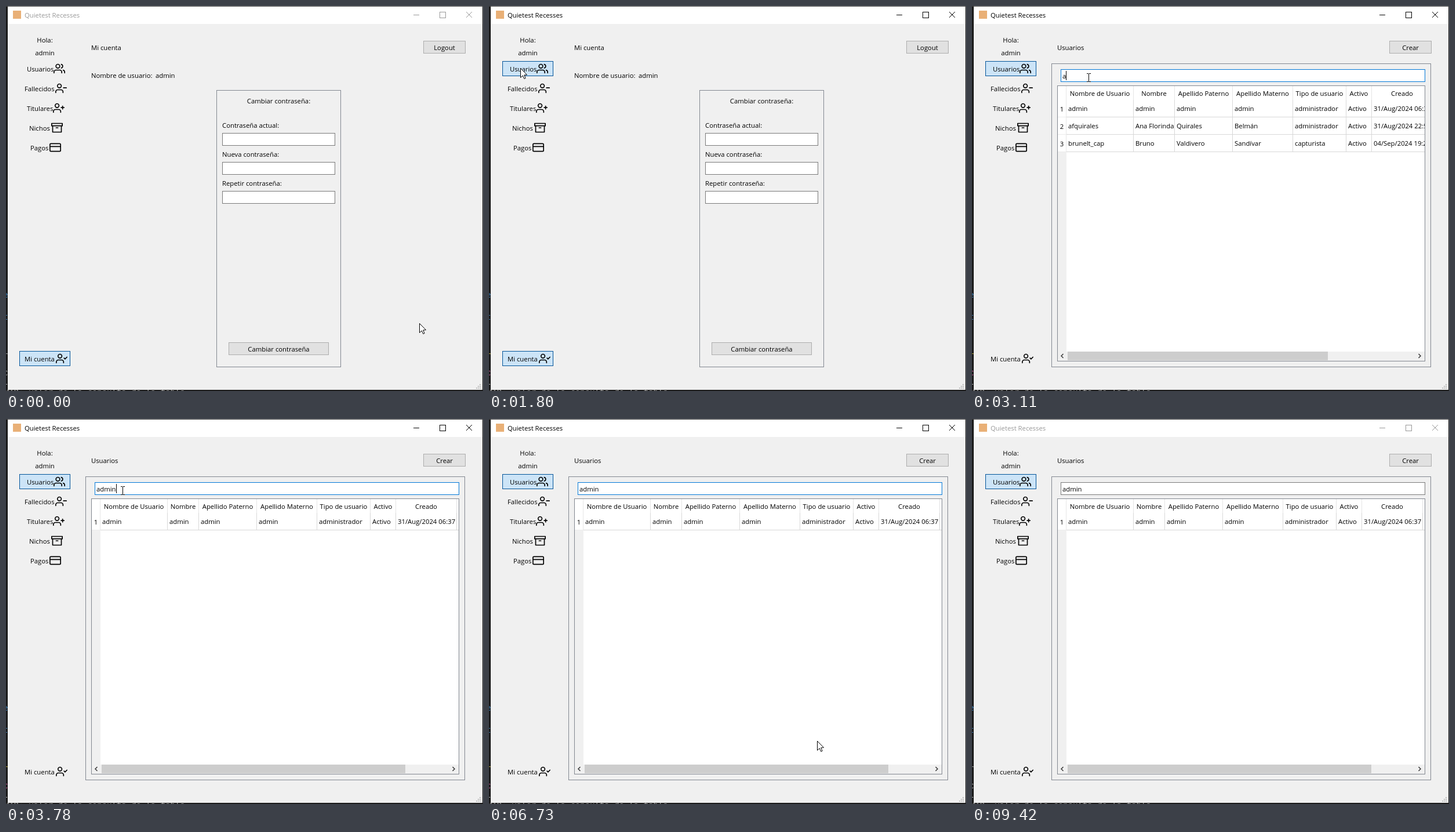
Write an HTML page with a canvas that moves like this. It is 823 px wide and 664 px high and loops after 9550 ms.

```html
<!DOCTYPE html>
<html lang="es">
<head>
<meta charset="utf-8">
<title>Usuarios</title>
<style>
html, body { margin: 0; width: 100%; height: 100%; overflow: hidden; background: #1c1c1c; }
canvas { display: block; }
</style>
</head>
<body>
<canvas id="stage" width="823" height="664"></canvas>
<script>
const g = document.getElementById('stage').getContext('2d');
const LOOP = 9550;
const FONT = '11.3px "Open Sans", "Noto Sans", sans-serif';
const MONO = '14px "DejaVu Sans Mono", monospace';

// Moments at which the interface changes
const CLICK = 1660, PAGE = 1930, HOVER = 2150, FOCUS = 2500, BLUR = 9420;
const FILTER_A = 3110, FILTER_AD = 3180;
const KEYS = [3040, 3180, 3450, 3580, 3780];
const BLINK = 532;

// Pointer samples: time, x, y
const TRACK = [
  [0, 713, 547], [70, 704, 530], [130, 640, 455], [200, 520, 345], [260, 380, 235],
  [330, 240, 150], [400, 130, 100], [460, 78, 82], [530, 55, 99], [730, 54, 99],
  [1060, 54, 103], [1130, 54, 107], [2010, 62, 109], [2080, 105, 114], [2150, 160, 120],
  [2220, 191, 124], [2290, 198, 126], [2360, 200, 126], [2630, 201, 123],
  [6450, 203, 128], [6520, 222, 172], [6590, 310, 290], [6660, 450, 450],
  [6730, 566, 555], [6800, 630, 605], [6870, 665, 631], [6940, -50, -50]
];

const person = (x, w) =>
  `M${w} 21v-2a4 4 0 0 0-4-4H5a4 4 0 0 0-4 4v2M${x + 4} 7a4 4 0 1 1-8 0a4 4 0 1 1 8 0`;
const ICONS = {
  users: person(9, 17) + 'M23 21v-2a4 4 0 0 0-3-3.87M16 3.13a4 4 0 0 1 0 7.75',
  minus: person(8.5, 16) + 'M23 11H17',
  plus: person(8.5, 16) + 'M20 8v6M23 11H17',
  box: 'M21 8v13H3V8M1 3h22v5H1zM10 12h4',
  card: 'M3 4h18a2 2 0 0 1 2 2v12a2 2 0 0 1-2 2H3a2 2 0 0 1-2-2V6a2 2 0 0 1 2-2zM1 10h22',
  check: person(8.5, 16) + 'M17 11l2 2 4-4'
};
for (const k in ICONS) ICONS[k] = new Path2D(ICONS[k]);

const MENU = [
  ['Usuarios', 36, 95, 82, 'users'],
  ['Fallecidos', 32, 129, 85, 'minus'],
  ['Titulares', 36, 163, 81, 'plus'],
  ['Nichos', 40, 197, 78, 'box'],
  ['Pagos', 42, 231, 75, 'card'],
  ['Mi cuenta', 32, 595, 86, 'check']
];

const HEAD = ['Nombre de Usuario', 'Nombre', 'Apellido Paterno', 'Apellido Materno',
  'Tipo de usuario', 'Activo', 'Creado'];
const ROWS = [
  ['admin', 'admin', 'admin', 'admin', 'administrador', 'Activo', '31/Aug/2024 06:37'],
  ['afquirales', 'Ana Florinda', 'Quirales', 'Belmán', 'administrador', 'Activo', '31/Aug/2024 22:51'],
  ['brunelt_cap', 'Bruno', 'Valdivero', 'Sandívar', 'capturista', 'Activo', '04/Sep/2024 19:24'],
  ['user', 'Nombre', 'user', 'user', 'capturista', 'Activo', '06/Sep/2024 12:55']
];

function fill(x, y, w, h, color) {
  g.fillStyle = color;
  g.fillRect(x, y, w, h);
}

function frame(x, y, w, h, border, inner) {
  if (inner) fill(x, y, w, h, inner);
  g.strokeStyle = border;
  g.lineWidth = 1;
  g.strokeRect(x + 0.5, y + 0.5, w - 1, h - 1);
}

function text(s, x, y, color = '#000', align = 'left') {
  g.font = FONT;
  g.textAlign = align;
  g.fillStyle = color;
  g.fillText(s, x, y);
}

function line(points, color, width = 1) {
  g.strokeStyle = color;
  g.lineWidth = width;
  g.beginPath();
  points.forEach(([x, y]) => g.lineTo(x, y));
  g.stroke();
}

function button(label, x, y, w) {
  frame(x, y, w, 22, '#adadad', '#e1e1e1');
  text(label, x + w / 2, y + 16, '#000', 'center');
}

function icon(name, x, y) {
  g.save();
  g.translate(x, y);
  g.scale(20 / 24, 20 / 24);
  g.strokeStyle = '#000';
  g.lineWidth = 2;
  g.lineCap = g.lineJoin = 'round';
  g.stroke(ICONS[name]);
  g.restore();
}

// Slivers of the dark editor behind the window
function backdrop(active) {
  fill(0, 0, 823, 664, '#1c1c1c');
  g.font = MONO;
  g.textAlign = 'left';
  const bits = [['e', 503, '#3f7fb5'], ['t', 541, '#3f7fb5'],
    ['r', 607, active ? '#b5a642' : '#999'], ['c', 637, active ? '#c55a9a' : '#aaa'], ['l', 653, '#aaa']];
  for (const [s, y, color] of bits) {
    g.fillStyle = color;
    g.fillText(s, -5, y);
  }
  g.fillStyle = '#999';
  g.fillText('MID: valor de la consulta de la tabla', -3, 671);
}

function windowFrame(active) {
  const ink = active ? '#000' : '#999';
  fill(3, 1, 819, 661, '#f0f0f0');
  fill(3, 1, 819, 30, '#fff');
  fill(0, 0, 823, 1, '#454545');
  fill(12, 8, 14, 14, '#e9b077');
  text('Quietest Recesses', 32, 20, ink);
  fill(703, 15, 10, 1, ink);
  frame(748, 10, 11, 11, ink);
  line([[794, 10], [804, 20]], ink);
  line([[804, 10], [794, 20]], ink);
  for (let i = 0; i < 3; i++)
    for (let j = 0; j <= i; j++) fill(817 - j * 3, 652 + i * 3, 2, 2, '#bfbfbf');
}

function sidebar(t) {
  text('Hola:', 67, 63, '#000', 'center');
  text('admin', 67, 85, '#000', 'center');
  for (const [label, x, y, ix, name] of MENU) {
    const on = name === 'users' ? t >= CLICK : name === 'check' && t < PAGE;
    if (on) frame(23, y, 88, 26, '#005499', '#cce4f7');
    text(label, x, y + 18);
    icon(name, ix, y + 3);
  }
}

function accountPage() {
  text('Mi cuenta', 147, 76);
  button('Logout', 720, 60, 73);
  text('Nombre de usuario:', 147, 124);
  text('admin', 258, 124);
  frame(363, 145, 215, 478, '#828790');
  text('Cambiar contraseña:', 470.5, 168, '#000', 'center');
  ['Contraseña actual:', 'Nueva contraseña:', 'Repetir contraseña:'].forEach((s, i) => {
    text(s, 373, 210 + i * 50);
    frame(373, 219 + i * 50, 195, 22, '#7a7a7a', '#fff');
  });
  button('Cambiar contraseña', 384, 580, 173);
}

function searchBox(t) {
  const focused = t >= FOCUS && t < BLUR;
  const border = focused ? '#0078d7' : t >= HOVER && t < FOCUS ? '#303030' : '#7a7a7a';
  const typed = 'admin'.slice(0, KEYS.filter(k => t >= k).length);
  frame(153, 109, 629, 22, border, '#fff');
  if (typed) text(typed, 156, 125);
  else text('Buscar usuario...', 156, 125, '#858585');
  if (!focused) return;
  const since = t - Math.max(FOCUS, ...KEYS.filter(k => t >= k));
  if (Math.floor((since + 2) / BLINK) % 2 === 0) {
    g.font = FONT;
    fill(Math.round(156 + g.measureText(typed).width), 112, 1, 16, '#000');
  }
}

function table(t) {
  const single = t >= FILTER_AD;
  const count = single ? 1 : t >= FILTER_A ? 3 : 4;
  const widths = [116, single ? 54 : 71, 100, 104, 92, 44, 105];
  const bottom = 162 + count * 30;
  const grid = '#d8d8d8';
  frame(147, 137, 635, 476, '#828790', '#fff');
  g.save();
  g.beginPath();
  g.rect(148, 138, 633, 474);
  g.clip();
  fill(148, bottom, 15, 596 - bottom, '#f0f0f0');
  if (t >= 6520 && t < 6590) fill(163, 162, 115, 29, '#e5f3ff');
  fill(162, 138, 1, bottom - 138, '#e5e5e5');
  let x = 163;
  widths.forEach((w, c) => {
    text(HEAD[c], x + w / 2 - 0.5, 155, '#000', 'center');
    for (let r = 0; r < count; r++) text(ROWS[r][c], x + 3, 181 + r * 30);
    x += w;
    fill(x - 1, 138, 1, 24, '#e5e5e5');
    fill(x - 1, 162, 1, bottom - 162, grid);
  });
  for (let r = 0; r < count; r++) {
    text(r + 1, 155, 182 + r * 30, '#000', 'center');
    fill(148, 191 + r * 30, 15, 1, '#ececec');
    fill(163, 191 + r * 30, 618, 1, grid);
  }
  fill(148, 596, 633, 16, '#f0f0f0');
  fill(165, 596, single ? 524 : 449, 15, '#cdcdcd');
  line([[157.5, 600], [154, 603.5], [157.5, 607]], '#404040', 1.6);
  line([[770.5, 600], [774, 603.5], [770.5, 607]], '#404040', 1.6);
  g.restore();
}

function usersPage(t) {
  text('Usuarios', 147, 76);
  button('Crear', 720, 60, 73);
  frame(137, 99, 655, 524, '#828790');
  searchBox(t);
  table(t);
}

function pointer(t) {
  const [, x, y] = TRACK.findLast(p => t >= p[0]);
  const beam = t >= PAGE && x > 153 && x < 782 && y > 109 && y < 131;
  if (beam) {
    fill(x, y - 6, 1, 13, '#000');
    for (const end of [y - 7, y + 7]) {
      fill(x - 3, end, 3, 1, '#000');
      fill(x + 1, end, 3, 1, '#000');
    }
    return;
  }
  g.save();
  g.translate(x + 0.5, y + 0.5);
  g.beginPath();
  [[0, 0], [0, 16], [3.7, 12.5], [6.3, 18], [8.6, 17], [6.2, 11.5], [11, 11.2]]
    .forEach(([px, py]) => g.lineTo(px, py));
  g.closePath();
  g.fillStyle = '#fff';
  g.fill();
  g.strokeStyle = '#000';
  g.lineWidth = 1;
  g.stroke();
  g.restore();
}

function draw(t) {
  const active = t >= CLICK && t < BLUR;
  backdrop(active);
  windowFrame(active);
  sidebar(t);
  if (t < PAGE) accountPage();
  else usersPage(t);
  pointer(t);
}

const start = performance.now();
function tick() {
  draw((performance.now() - start) % LOOP);
  requestAnimationFrame(tick);
}
tick();
</script>
</body>
</html>
```
